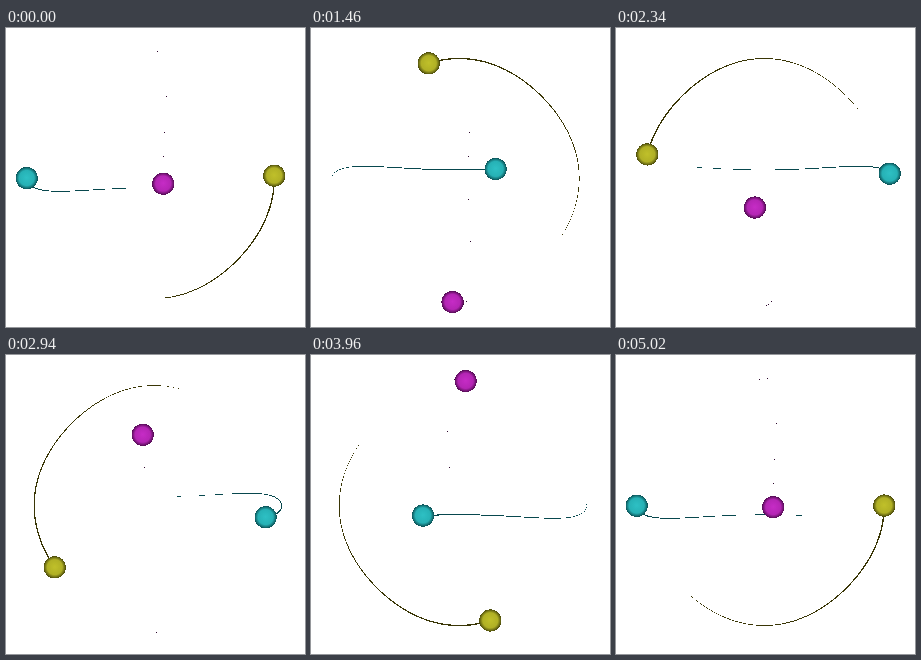
An HTML page with a canvas for the animation above (5.04 s loop, 299 by 299 pixels).

```html
<!DOCTYPE html>
<html lang="en">
<head>
<meta charset="utf-8">
<title>Three orbits</title>
<style>
  html, body { margin: 0; width: 100%; height: 100%; overflow: hidden; background: #fff; }
  canvas { display: block; width: 299px; height: 299px; }
</style>
</head>
<body>
<canvas id="stage" width="299" height="299"></canvas>
<script>
const ctx = document.getElementById('stage').getContext('2d');
const LOOP = 5040, STEP = 20, RADIUS = 11.1, START_TAIL = 88;
const rad = deg => deg * Math.PI / 180;

// Phase with a slight unevenness of speed, in radians.
const phase = (deg, lead, wobble) => rad(deg + lead - wobble * Math.sin(rad(deg + lead)));

// Narrow waisted loop: position along its length and across it.
function waisted(deg) {
  const a = phase(deg, 1.5, 0.7);
  return [
    130.8 * (Math.cos(a) - 0.025 * Math.cos(3 * a)),
    13.3 * Math.sin(a) + 4.4 * Math.sin(3 * a)
  ];
}

const bodies = [
  {
    colors: ['#c0c02a', '#b0b025', '#4c4c0c'], trail: '#3a3606', tail: 135, width: 1.4, taper: true,
    at(deg) {
      const a = phase(deg, 1.4, 0.9);
      const r = 118.2 + 1.8 * Math.cos(4 * a);
      return [148.2 + r * Math.cos(a), 150.5 - r * Math.sin(a)];
    }
  },
  {
    colors: ['#2ec0c4', '#26b1b5', '#0b5256'], trail: '#08484e', tail: 112, width: 1.1, taper: true,
    at(deg) {
      const [along, across] = waisted(deg);
      return [148.2 - along, 150.8 - across];
    }
  },
  {
    colors: ['#c62cc6', '#b425b4', '#540c54'], trail: '#2c062c', tail: 130, width: 0.025, taper: false,
    at(deg) {
      const [along, across] = waisted(deg - 90);
      return [148.3 - across, 150.3 + along];
    }
  }
];

// Hard-edged line: a pixel is lit when its centre lies within the stroke.
function drawTrail(body, deg) {
  const length = Math.min(body.tail, START_TAIL + deg);
  ctx.fillStyle = body.trail;
  let [x, y] = body.at(deg);
  for (let age = 0.2; age < length; age += 0.2) {
    const [nx, ny] = body.at(deg - age);
    const dx = nx - x, dy = ny - y, len = Math.hypot(dx, dy) || 1;
    x = nx;
    y = ny;
    const half = body.width / 2 * (body.taper ? Math.sqrt(1 - age / body.tail) : 1);
    const steep = Math.abs(dy) > Math.abs(dx);
    for (let k = -1; k <= 1; k++) {
      const px = Math.floor(x) + (steep ? k : 0);
      const py = Math.floor(y) + (steep ? 0 : k);
      const gap = Math.abs((px + 0.5 - x) * dy - (py + 0.5 - y) * dx) / len;
      if (gap < half) ctx.fillRect(px, py, 1, 1);
    }
  }
}

// Shaded disc with a hard edge, filled row by row.
function drawBall(body, deg) {
  const [x, y] = body.at(deg);
  const shade = ctx.createRadialGradient(x, y - 0.5, 0, x, y, RADIUS);
  [0, 0.68, 1].forEach((stop, i) => shade.addColorStop(stop, body.colors[i]));
  ctx.fillStyle = shade;
  for (let row = Math.floor(y - RADIUS); row <= y + RADIUS; row++) {
    const half = Math.sqrt(Math.max(0, RADIUS ** 2 - (row + 0.5 - y) ** 2));
    const left = Math.round(x - half);
    ctx.fillRect(left, row, Math.round(x + half) - left, 1);
  }
}

function render(ms) {
  const t = Math.floor((ms % LOOP) / STEP) * STEP;
  const deg = 360 * t / LOOP;
  ctx.fillStyle = '#fff';
  ctx.fillRect(0, 0, 299, 299);
  bodies.forEach(body => drawTrail(body, deg));
  bodies.forEach(body => drawBall(body, deg));
}

const start = performance.now();
function tick() {
  render(performance.now() - start);
  requestAnimationFrame(tick);
}
tick();
</script>
</body>
</html>
```
